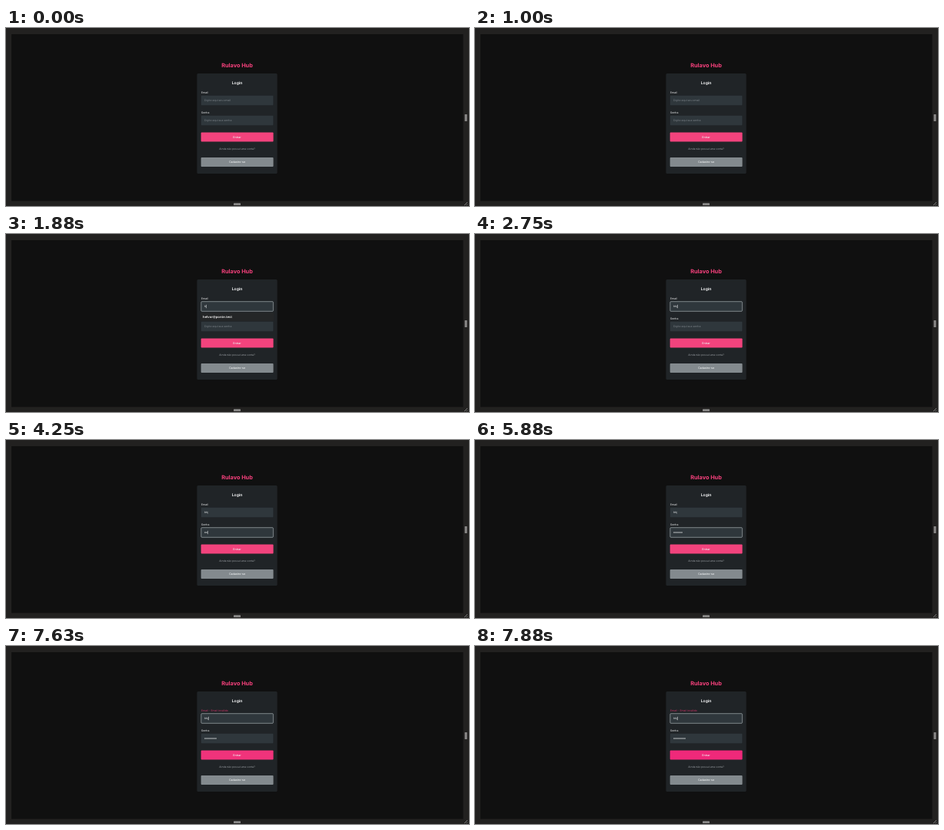
Write an HTML page that moves like this. It is 600 px wide and 231 px high and loops after 8 s.

```html
<!DOCTYPE html>
<html lang="pt-BR">
<head>
<meta charset="utf-8">
<title>Login</title>
<style>
  html, body { margin: 0; width: 100%; height: 100%; overflow: hidden; background: #222120; }
  svg { display: block; width: 100vw; height: 100vh; }
  text { font: 3.5px Inter, sans-serif; fill: #eceeef; text-rendering: geometricPrecision; }
  .title { font-size: 7.3px; font-weight: 700; fill: #f7417d; }
  .heading { font-size: 5px; font-weight: 700; }
  .mid { text-anchor: middle; }
  .button { font-size: 3.6px; font-weight: 500; }
  .note { font-size: 3.35px; fill: #9a9fa3; }
  .hint { fill: #7b8287; }
  .field { fill: #2f373c; stroke-width: .6; }
  #list text { font: 600 4.1px "Noto Sans", sans-serif; fill: #dedede; }
</style>
</head>
<body>
<svg viewBox="0 0 600 231">
  <rect width="600" height="231" fill="#222120"/>
  <rect x="7" y="8" width="585.5" height="216.5" fill="#101010"/>
  <g fill="#8b8a89">
    <rect x="594.5" y="112" width="3" height="9" rx=".5"/>
    <rect x="295" y="227.3" width="9" height="2.6" rx=".5"/>
  </g>
  <path d="M594 230l4-4M596.5 230l1.5-1.5" stroke="#a09f9e" stroke-width=".7"/>

  <text class="title mid" x="299.5" y="51">Rulavo Hub</text>
  <rect x="247.5" y="59" width="104" height="130" rx="1.5" fill="#202427"/>
  <text class="heading mid" x="299.5" y="73">Login</text>

  <text id="emailLabel" x="253" y="85.3">Email</text>
  <rect id="emailBox" class="field" x="252.9" y="87.7" width="93.4" height="12.6" rx="1"/>
  <text id="email" x="257" y="95.3"></text>

  <text x="253" y="111.3">Senha</text>
  <rect id="passBox" class="field" x="252.9" y="113.7" width="93.4" height="12.6" rx="1"/>
  <text id="passHint" class="hint" x="257" y="121.3">Digite aqui sua senha</text>
  <path id="dots" fill="none" stroke="#eceeef" stroke-width="1.4" stroke-linecap="round" stroke-dasharray="0 2"/>

  <rect id="submit" x="252.7" y="135.5" width="93.8" height="12" rx="1"/>
  <text class="button mid" x="299.5" y="142.8">Entrar</text>
  <text class="note mid" x="299.5" y="158">Ainda não possui uma conta?</text>
  <rect x="252.7" y="168" width="93.8" height="12" rx="1" fill="#838a8e"/>
  <text class="button mid" x="299.5" y="175.3">Cadastre-se</text>

  <g id="list"></g>
  <rect id="caret" width=".5" height="4.4" fill="#f4f5f6"/>
</svg>
<script>
const LOOP = 8000;
const $ = id => document.getElementById(id);
const set = (id, name, value) => $(id).setAttribute(name, value);
const show = (id, on) => set(id, 'visibility', on ? 'visible' : 'hidden');

// Value of the latest [time, value] step that has begun.
const stepAt = (t, steps) => steps.filter(([start]) => t >= start).pop()[1];

const EMAIL = [[0, ''], [1880, 'h'], [2250, 'hh'], [2750, 'hhj']];
const DOTS = [[0, 0], [4130, 1], [4250, 2], [4500, 3], [4880, 4], [5130, 5], [5380, 6], [6130, 7], [6380, 8]];
const FOCUS = [[0, ''], [1250, 'email'], [3500, 'pass'], [7500, ''], [7630, 'email']];
const CARET = [[0, 0], [1250, 1], [1630, 0], [1880, 1], [3250, 0], [3500, 1], [4000, 0], [4130, 1],
  [5880, 0], [6130, 1], [6880, 0], [7380, 1], [7500, 0], [7630, 1]];
const LIST = [[0, 'none'], [1250, 'all'], [1880, 'match'], [2250, 'none']];
const LISTS = {
  none: [],
  all: ['davi', 'provarapida', 'bibi', 'daviviajando', 'davipassando', 'daviMoraes1'],
  match: ['helvor']
};

function listMarkup(names) {
  if (!names.length) return '';
  const rows = names.map((name, i) =>
    `<text x="255" y="${108.8 + i * 9.4}">${name}@ponte.test</text>`);
  return `<rect x="251.8" y="102" width="95.4" height="${names.length * 9.4 + 1.4}" rx=".8" fill="#242627"/>` + rows.join('');
}

let shownList = 'none';

function render(t) {
  const email = stepAt(t, EMAIL);
  const dots = stepAt(t, DOTS);
  const focus = stepAt(t, FOCUS);
  const list = stepAt(t, LIST);
  const failed = t >= 7630;

  $('email').textContent = email || 'Digite aqui seu email';
  set('email', 'class', email ? '' : 'hint');
  $('emailLabel').textContent = failed ? 'Email - Email inválido' : 'Email';
  $('emailLabel').style.fill = failed ? '#c93467' : '';
  for (const name of ['email', 'pass']) set(name + 'Box', 'stroke', focus === name ? '#b9c3c6' : 'none');

  show('passHint', !dots);
  show('dots', dots);
  set('dots', 'd', `M258 120h${Math.max(0, dots * 2 - 1.9)}`);

  const hover = Math.min(1, Math.max(0, (t - 7450) / 300));
  const mix = (from, to) => Math.round(from + (to - from) * hover);
  set('submit', 'fill', `rgb(${mix(242, 239)},${mix(67, 41)},${mix(125, 122)})`);

  if (list !== shownList) $('list').innerHTML = listMarkup(LISTS[shownList = list]);

  const inEmail = focus === 'email';
  const typed = inEmail ? (email ? $('email').getComputedTextLength() : 0) : dots * 2;
  set('caret', 'x', 257 + typed);
  set('caret', 'y', inEmail ? 91.8 : 117.8);
  show('caret', focus && stepAt(t, CARET));
}

function frame() {
  render(performance.now() % LOOP);
  requestAnimationFrame(frame);
}
frame();
</script>
</body>
</html>
```
